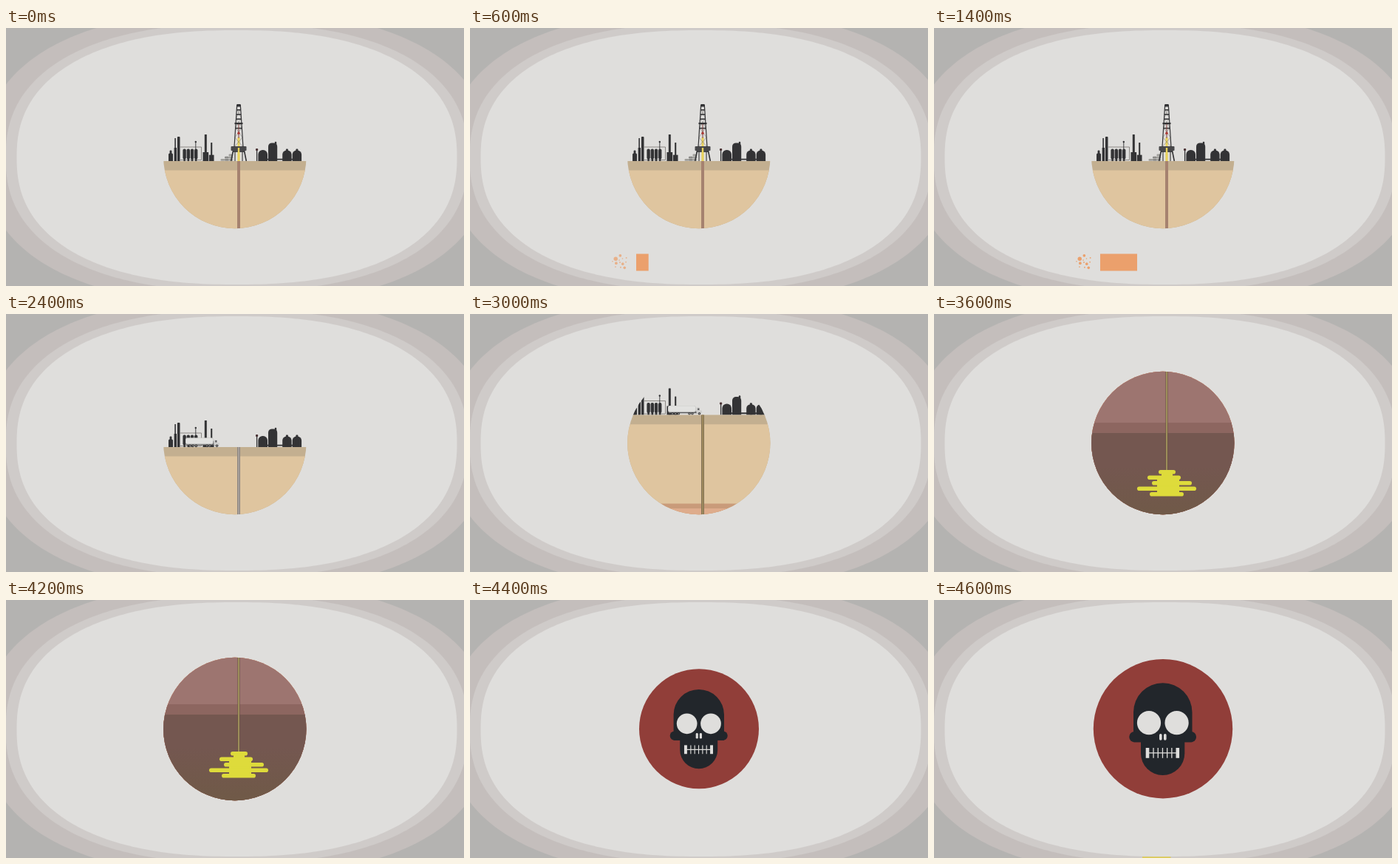
Write an HTML page with a canvas that moves like this. It is 620x349 px and loops after 4800 ms.

```html
<!DOCTYPE html>
<html lang="en">
<head>
<meta charset="utf-8">
<title>Drilling site</title>
<style>
html, body { margin: 0; width: 100%; height: 100%; overflow: hidden; background: #dfdedc; }
canvas { display: block; width: 620px; height: 349px; }
</style>
</head>
<body>
<canvas id="stage" width="620" height="349"></canvas>
<script>
const ctx = document.getElementById('stage').getContext('2d');
const LOOP = 4800, STEP = 200;
const CX = 309.8, CY = 174.5, R = 96.7;
const GROUND = 180, DEPTH = 400, WELL = 315;
const DARK = '#333335', STEEL = '#77736f', ORANGE = '#eba06c', PAPER = '#dfdedc', FLAME = '#e9d35c';

const clamp = v => Math.max(0, Math.min(1, v));

function box(color, x, y, w, h, r = 0) {
  ctx.fillStyle = color;
  ctx.beginPath();
  ctx.roundRect(x, y, w, h, r);
  ctx.fill();
}
function dot(color, x, y, r) {
  ctx.fillStyle = color;
  ctx.beginPath();
  ctx.arc(x, y, r, 0, Math.PI * 2);
  ctx.fill();
}
function line(color, width, ...p) {
  ctx.strokeStyle = color;
  ctx.lineWidth = width;
  ctx.beginPath();
  for (let i = 0; i < p.length; i += 2) ctx.lineTo(p[i], p[i + 1]);
  ctx.stroke();
}
// a part standing on the ground, given by its centre, width and height
function stand(x, w, h, r = 0, color = DARK) {
  box(color, x - w / 2, GROUND - h, w, h, [r, r, 0, 0]);
}
function clipGlobe() {
  ctx.beginPath();
  ctx.arc(CX, CY, R, 0, Math.PI * 2);
  ctx.clip();
}

function superellipse(color, k) {
  const bend = v => Math.sign(v) * Math.abs(v) ** (2 / 2.35);
  ctx.fillStyle = color;
  ctx.beginPath();
  for (let a = 0; a < Math.PI * 2; a += 0.02)
    ctx.lineTo(312.5 + 298 * k * bend(Math.cos(a)), 175 + 172 * k * bend(Math.sin(a)));
  ctx.fill();
}
function backdrop() {
  box('#b4b3b1', 0, 0, 620, 349);
  superellipse('#c4bebc', 1.15);
  superellipse('#cfcbc9', 1.05);
  superellipse(PAPER, 1);
}

function refinery() {
  stand(223, 2.8, 14.5, 1);
  stand(223, 6, 10.5, 1.5);
  stand(229.1, 1.6, 31);
  stand(229.3, 3.4, 18);
  stand(233.7, 3.6, 33, 1);
  line(STEEL, 0.8, 236, 161, 264.5, 161, 264.5, 178.5, 236, 178.5);
  line(DARK, 0.9, 256.8, 154, 256.8, 165);
  dot(DARK, 256.8, 154, 1.2);
  for (let x = 241.6; x < 260; x += 5.2) {
    box(DARK, x - 2.2, 163.5, 4.4, 14, 2);
    stand(x, 2.4, 4);
  }
  for (const [x, h] of [[270.3, 36], [278.2, 25]]) {
    stand(x, h / 12, h, 0.5);
    stand(x, 4.4 + h / 11, h / 3);
  }
}

function tanks() {
  stand(339.6, 1.3, 16);
  box('#4a3234', 338, 163, 3.2, 3, 1);
  stand(347.7, 12.6, 15, 6);
  stand(361.1, 12.2, 24.6, 5);
  box(DARK, 363.8, 153.8, 2.4, 5, 1);
  box(DARK, 354, 176.8, 36, 1.8);
  for (const x of [380.4, 393.9]) {
    stand(x, 12.4, 14.4, 5.5);
    stand(x, 3, 16.4, 1);
  }
}

function bags() {
  for (let row = 0; row < 3; row++)
    for (let i = row; i < 3; i++)
      box(i % 2 ? '#8b8a87' : '#a09f9b', 290.5 + i * 5.5, 177 - row * 3.2, 5.8, 2.8, 1.2);
}

function rig() {
  const half = y => 2.3 + (y - 104) * 0.065;
  stand(WELL, 3, 32, 0, FLAME);
  for (let y = 109; y < 155; y += 13) {
    line(STEEL, 0.5, WELL - half(y), y, WELL + half(y + 13), y + 13);
    line(STEEL, 0.5, WELL + half(y), y, WELL - half(y + 13), y + 13);
  }
  for (let y = 110; y < 140; y += 6.2)
    box(DARK, WELL - half(y), y, half(y) * 2, 1.6);
  box(DARK, WELL - 5.5, 128, 11, 2.2);
  box(DARK, 312.2, 103, 5.6, 3.5, 1);
  line('#7d3a38', 1, WELL, 130, WELL, 149);
  dot('#ad3833', WELL, 142.3, 1.7);
  box('#48484a', 304.5, 160, 21, 6, 1);
  box('#48484a', 307, 165, 16, 3);
  for (const side of [-1, 1]) {
    line(DARK, 1.2, WELL + side * 2.3, 104, WELL + side * half(161), 161);
    line(DARK, 1.6, WELL + side * 7.5, 166, WELL + side * 10.3, 180);
    line(DARK, 1.1, WELL + side * 5, 167, WELL + side * 5, 180);
  }
  stand(WELL, 2.4, 18, 0, FLAME);
}

function truck(t) {
  ctx.save();
  ctx.translate(25 - 100 * (1 - clamp((t - 2000) / 800)) ** 2, 0);
  box('#5b5b5d', 244, 175, 44, 2.6);
  box('#b5b5b3', 243, 167.5, 37.6, 8.9, 2.5);
  box('#e2e2e0', 243.3, 167.8, 37, 7.6, 2.2);
  box('#cfcfcd', 281.3, 170, 4.6, 7.5, 1);
  box('#cfcfcd', 285, 174, 4, 3.5, 1);
  box('#5b5b5d', 283.2, 171, 2.2, 2.4);
  for (const x of [249, 253.2, 257.4, 272, 276, 285.5]) {
    dot(DARK, x, 178.2, 1.7);
    dot('#b9b9b7', x, 178.2, 0.8);
  }
  ctx.restore();
}

function pool() {
  const left = [11, 26, 20, 40, 23], right = [12, 19, 34, 40, 23];
  const top = 205 + DEPTH, oil = '#dedb3b';
  box(oil, 302, top + 8, 30, 26);
  box(oil, 308, top + 2, 15, 10);
  left.forEach((w, i) => box(oil, WELL - w, top + i * 7.5, w + right[i], 5.6, 2.8));
}

function strata() {
  const layers = [
    [GROUND, '#c3af90'], [192.6, '#dfc59f'], [300, '#c99b7a'], [306.5, '#deac8c'],
    [402, '#c3827a'], [412, '#9d7570'], [541, '#8d6660'], [555, '#745750']
  ];
  for (const [y, color] of layers) box(color, 200, y, 220, 700 - y);
  const shade = ctx.createLinearGradient(0, 600, 0, 672);
  shade.addColorStop(0, '#6f5a4600');
  shade.addColorStop(1, '#6f5a46e0');
  box(shade, 200, 600, 220, 100);
}

function pipe(t) {
  const [edge, core] =
    t < 2000 ? ['#a58270', '#a58270'] :
    t < 3000 ? ['#8c8580', '#b3aba4'] :
    t < 3400 ? ['#857457', '#a8925f'] : ['#66533f', '#b5a866'];
  const w = t < 3400 ? 4 : 3;
  box(edge, WELL - w / 2, GROUND, w, 427);
  box(core, WELL - 0.7, GROUND, 1.4, 427);
}

function globe(t) {
  const u = clamp((t - 2800) / 1000);
  const scroll = DEPTH * (1 - (1 - u ** 2.3) ** 4.6);
  const drilling = t < 2000;
  ctx.save();
  if (!drilling) clipGlobe();
  ctx.translate(0, -scroll);
  refinery();
  tanks();
  if (drilling) {
    bags();
    rig();
  } else {
    truck(t);
  }
  ctx.restore();

  ctx.save();
  clipGlobe();
  ctx.translate(0, -scroll);
  strata();
  pipe(t);
  if (t >= 3400) pool();
  ctx.restore();
}

function additive(t) {
  if (t < 400 || t >= 2000) return;
  ctx.globalAlpha = clamp(0.5 + (t - 400) / 800);
  for (let i = 0; i < 13; i++) {
    const a = i * 2.4 + 2, r = 11 * Math.sqrt(i / 13);
    dot(ORANGE, 203 + r * Math.cos(a), 317 + r * Math.sin(a), 0.8 + 1.9 * Math.cos((i - 6) * 0.9) ** 6);
  }
  ctx.globalAlpha = 1;
  box(ORANGE, 225, 305.5, 50 * (t - 200) / 1200, 23);
}

function skull(t) {
  const k = t < 4600 ? 0.86 : 1, ink = '#22262b';
  ctx.save();
  ctx.translate(310, 174.2);
  ctx.scale(k, k);
  dot('#913e39', 0, 0, 94.2);
  box(ink, -40, -62, 79.5, 80, [39.7, 39.7, 0, 0]);
  box(ink, -45.7, 3.8, 90.7, 14.2, 7);
  box(ink, -30, 10, 59.3, 52.8, [0, 0, 29.6, 29.6]);
  for (const side of [-1, 1]) {
    dot(PAPER, side * 18.8 - 0.2, -8, 16.1);
    box(PAPER, side * 3 - 2, 6.8, 3.6, 8.8, 1.7);
    box(PAPER, side * 20.4 - 2.9, 25.8, 4.6, 13.8);
  }
  box(PAPER, -20, 32, 39, 1.4);
  for (let i = -2; i <= 2; i++) box(PAPER, i * 6.2 - 1.2, 25.8, 1.3, 13.8);
  ctx.restore();
  if (t >= 4600) box('#dccb58', 282, 347.3, 38.5, 2);
}

function draw(now) {
  const t = Math.floor((now % LOOP) / STEP) * STEP;
  backdrop();
  if (t < 4400) {
    globe(t);
    additive(t);
  } else {
    skull(t);
  }
}

const start = performance.now();
function tick() {
  draw(performance.now() - start);
  requestAnimationFrame(tick);
}
tick();
</script>
</body>
</html>
```
